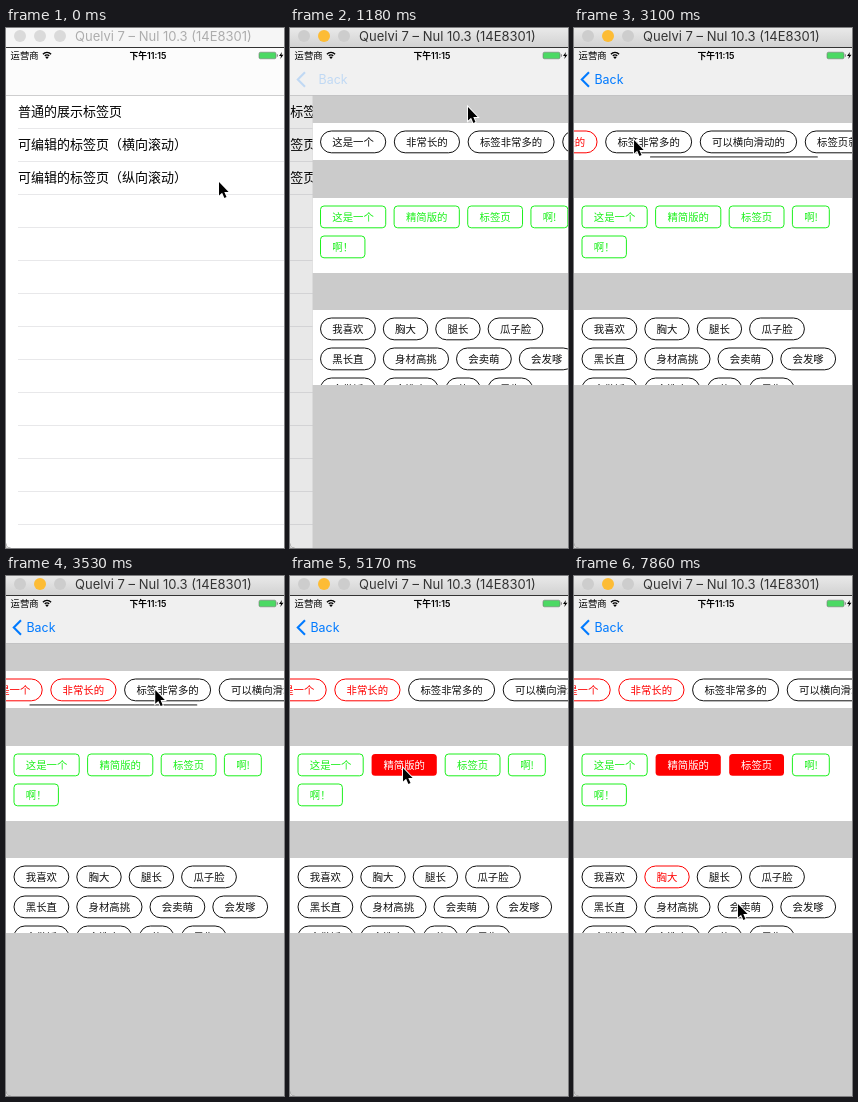
Write an HTML page that moves like this. It is 278 px wide and 520 px high and loops after 8 s.

```html
<!DOCTYPE html>
<html lang="zh">
<head>
<meta charset="utf-8">
<title>标签页</title>
<style>
  html, body { margin: 0; width: 100%; height: 100%; overflow: hidden; background: #fff; }
  svg { display: block; }
  text { font-family: Inter, "Noto Sans CJK SC", "Noto Sans CJK", sans-serif; }
  .cjk { font-family: "Noto Sans CJK SC", "Noto Sans CJK", sans-serif; }
</style>
</head>
<body>
<script>
const NS = 'http://www.w3.org/2000/svg';
const W = 278, H = 520, LOOP = 8000;

function add(parent, tag, attrs = {}, content) {
  const node = document.createElementNS(NS, tag);
  set(node, attrs);
  if (content) node.textContent = content;
  parent.appendChild(node);
  return node;
}
function set(node, attrs) {
  for (const key in attrs) node.setAttribute(key, attrs[key]);
}
const rect = (parent, x, y, width, height, fill, more = {}) =>
  add(parent, 'rect', { x, y, width, height, fill, ...more });

const stage = add(document.body, 'svg', { width: W, height: H, viewBox: `0 0 ${W} ${H}` });

// List screen
rect(stage, 0, 0, W, H, '#fff');
const list = add(stage, 'g');
['普通的展示标签页', '可编辑的标签页（横向滚动）', '可编辑的标签页（纵向滚动）'].forEach((label, i) =>
  add(list, 'text', { class: 'cjk', x: 12, y: 88.3 + 33 * i, 'font-size': 13 }, label));
for (let y = 100; y < H; y += 33) rect(list, 12, y, 380, 1, '#e8e8ea');
const dim = rect(stage, 0, 67, W, H, '#000');

// Tag screen
const CHAR = 10.4, PAD = 11.8, TAG_H = 21.8, LEFT = 8;
const page = add(stage, 'g');
rect(page, 0, 67, W, H, '#cbcbcb');

function addTag(parent, label, x, y, { color, radius, filled }) {
  const chars = [...label].reduce((n, c) => n + (c === '!' ? 0.28 : 1), 0);
  const width = 2 * PAD + CHAR * chars;
  const box = rect(parent, x, y, width, TAG_H, 'none', { rx: radius });
  const text = add(parent, 'text',
    { class: 'cjk', x: x + PAD, y: y + 14.9, 'font-size': CHAR }, label);
  function select(on) {
    const tint = on ? '#f00' : color;
    const solid = on && filled;
    set(box, { stroke: solid ? 'none' : tint, fill: solid ? tint : 'none' });
    set(text, { fill: solid ? '#fff' : tint });
  }
  select(false);
  return { width, select };
}

function tagPanel(y, height, gap, rows, style) {
  const panel = add(page, 'svg', { x: 0, y, width: W, height });
  rect(panel, 0, 0, W, height, '#fff');
  const body = add(panel, 'g');
  const tags = [];
  rows.forEach((row, r) => {
    let x = LEFT;
    for (const label of row.split(' ')) {
      const tag = addTag(body, label, x, 8 + 30 * r, style);
      tags.push(tag);
      x += tag.width + gap;
    }
  });
  return { panel, body, tags };
}

const pill = { color: '#111', radius: TAG_H / 2 };
const scroller = tagPanel(95, 37, 8.6,
  ['这是一个 非常长的 标签非常多的 可以横向滑动的 标签页就是这样'], pill);
const compact = tagPanel(170, 75, 8.4,
  ['这是一个 精简版的 标签页 啊!', '啊！'], { color: '#1cf01c', radius: 3.5, filled: true });
const wrapped = tagPanel(282, 75, 8,
  ['我喜欢 胸大 腿长 瓜子脸', '黑长直 身材高挑 会卖萌 会发嗲', '会做饭 会洗衣 的 男生'], pill);
const CONTENT = 460;
const bar = rect(scroller.panel, 0, 33, W * W / CONTENT, 1.8, '#7c7c7c', { rx: 0.9 });

// Navigation and status bars
rect(stage, 0, 19, W, 48, '#fcfcfc');
const navTint = rect(stage, 0, 19, W, 48, '#f0f0f0');
rect(stage, 0, 67, W, 0.8, '#c2c2c4');
const back = add(stage, 'g', { fill: '#007aff' });
add(back, 'path', { d: 'M15 44.3 L7.8 51.5 L15 58.7', fill: 'none', stroke: '#007aff', 'stroke-width': 2.1 });
const backText = add(back, 'text', { y: 56, 'font-size': 12.4 }, 'Back');

add(stage, 'text', { class: 'cjk', x: 4.6, y: 30.7, 'font-size': 9.3 }, '运营商');
add(stage, 'text', { x: 142, y: 30.7, 'font-size': 8.8, 'font-weight': 600, 'text-anchor': 'middle' }, '下午11:15');
const wifi = add(stage, 'g', { fill: 'none', stroke: '#000', 'stroke-width': 1.3 });
for (const r of [2.8, 5.2]) {
  const dx = r * 0.78, y = 30 - r * 0.72;
  add(wifi, 'path', { d: `M${41 - dx} ${y} A${r} ${r} 0 0 1 ${41 + dx} ${y}` });
}
add(stage, 'path', { d: 'M41 31 L39.4 29.2 Q41 28 42.6 29.2Z' });
rect(stage, 253, 24.2, 17, 6.6, '#4cd964', { rx: 1.5, stroke: '#777', 'stroke-width': 0.6 });
rect(stage, 270.8, 26.3, 1, 2.4, '#777');
add(stage, 'path', { d: 'M276 24 L273 28 H275 L274.3 31 L277.5 26.8 H275.4Z' });

// Window title bar
const shade = add(add(stage, 'defs'), 'linearGradient', { id: 'shade', x2: 0, y2: 1 });
add(shade, 'stop', { offset: 0, 'stop-color': '#e9e9e9' });
add(shade, 'stop', { offset: 1, 'stop-color': '#d2d2d2' });
const titleBar = rect(stage, 0, 0, W, 19, '#f6f6f6');
rect(stage, 0, 19, W, 1, '#333');
const dots = [14, 34, 54].map(cx => add(stage, 'circle', { cx, cy: 8, r: 6 }));
const title = add(stage, 'text', { x: 69, y: 13, 'font-size': 13 }, 'Quelvi 7 – Nul 10.3 (14E8301)');
add(stage, 'path', { d: 'M0 515.5 A4.5 4.5 0 0 0 4.5 520 H0Z', fill: '#fff', stroke: '#999', 'stroke-width': 0.6 });

const cursor = add(stage, 'path', {
  d: 'M0 0 V13.6 L3.1 10.8 L5.4 16 L7.5 15.1 L5.3 10 H9.6Z',
  stroke: '#fff', 'stroke-width': 1.8, 'paint-order': 'stroke'
});

// Stops of the pointer: time, x, y and the tag tapped there
const STOPS = [
  [290, 213, 154],
  [740, 200, 117],
  [1180, 178, 79],
  [1920, 60, 113, scroller.tags[0]],
  [2220, 117, 114, scroller.tags[1]],
  [2670, 184, 113],
  [3100, 60, 112],
  [4120, 275, 117],
  [4870, 113, 192, compact.tags[1]],
  [5500, 113, 192],
  [6070, 179, 190, compact.tags[2]],
  [6660, 108, 230],
  [7260, 95, 301, wrapped.tags[1]],
  [7850, 164, 328]
];
const ACTIVE = 590, PUSH = 895;
const DRAG = { start: 2670, turn: 3100, end: 3680, from: 184, rest: 37 };

const clamp = v => Math.min(1, Math.max(0, v));
const smooth = p => p * p * (3 - 2 * p);

function pointer(t) {
  const next = STOPS.findIndex(stop => stop[0] > t);
  const b = STOPS[next < 0 ? STOPS.length - 1 : next];
  const a = next > 0 ? STOPS[next - 1] : b;
  const p = a === b ? 0 : smooth((t - a[0]) / (b[0] - a[0]));
  return [1, 2].map(i => a[i] + (b[i] - a[i]) * p);
}

// The row follows the pointer while it is dragged
function scrollAt(t, x) {
  if (t < DRAG.start) return 0;
  if (t < DRAG.turn) return DRAG.from - x;
  return t < DRAG.end ? Math.max(DRAG.rest, DRAG.from - x) : DRAG.rest;
}

function render(t) {
  const [x, y] = pointer(t);
  const scroll = scrollAt(t, x);
  const push = t < PUSH ? 0 : 1 - Math.exp((PUSH - t) / 115);
  const active = t >= ACTIVE;

  set(list, { transform: `translate(${-0.3 * W * push})` });
  set(dim, { opacity: 0.1 * push });
  set(page, { transform: `translate(${W * (1 - push)})` });
  set(navTint, { opacity: push });
  set(back, { opacity: push ** 19 });
  set(backText, { x: 20.5 + 100 * (1 - push) });
  set(scroller.body, { transform: `translate(${-scroll})` });
  set(bar, {
    x: 1 + scroll * W / CONTENT,
    opacity: clamp(Math.min((t - DRAG.start) / 150, 1 - (t - DRAG.end) / 300))
  });
  set(cursor, { transform: `translate(${x} ${y})` });
  for (const [time, , , tag] of STOPS) if (tag) tag.select(t >= time);

  set(titleBar, { fill: active ? 'url(#shade)' : '#f6f6f6' });
  set(title, { fill: active ? '#333' : '#adadad' });
  dots.forEach((dot, i) =>
    set(dot, { fill: !active ? '#dadada' : i === 1 ? '#fdbc35' : '#cdcdcd' }));
}

const TICK = 148, LEAD = 28;
const start = performance.now();
function loop() {
  const t = (performance.now() - start) % LOOP;
  render(Math.floor((t + LEAD) / TICK) * TICK);
  requestAnimationFrame(loop);
}
loop();
</script>
</body>
</html>
```
